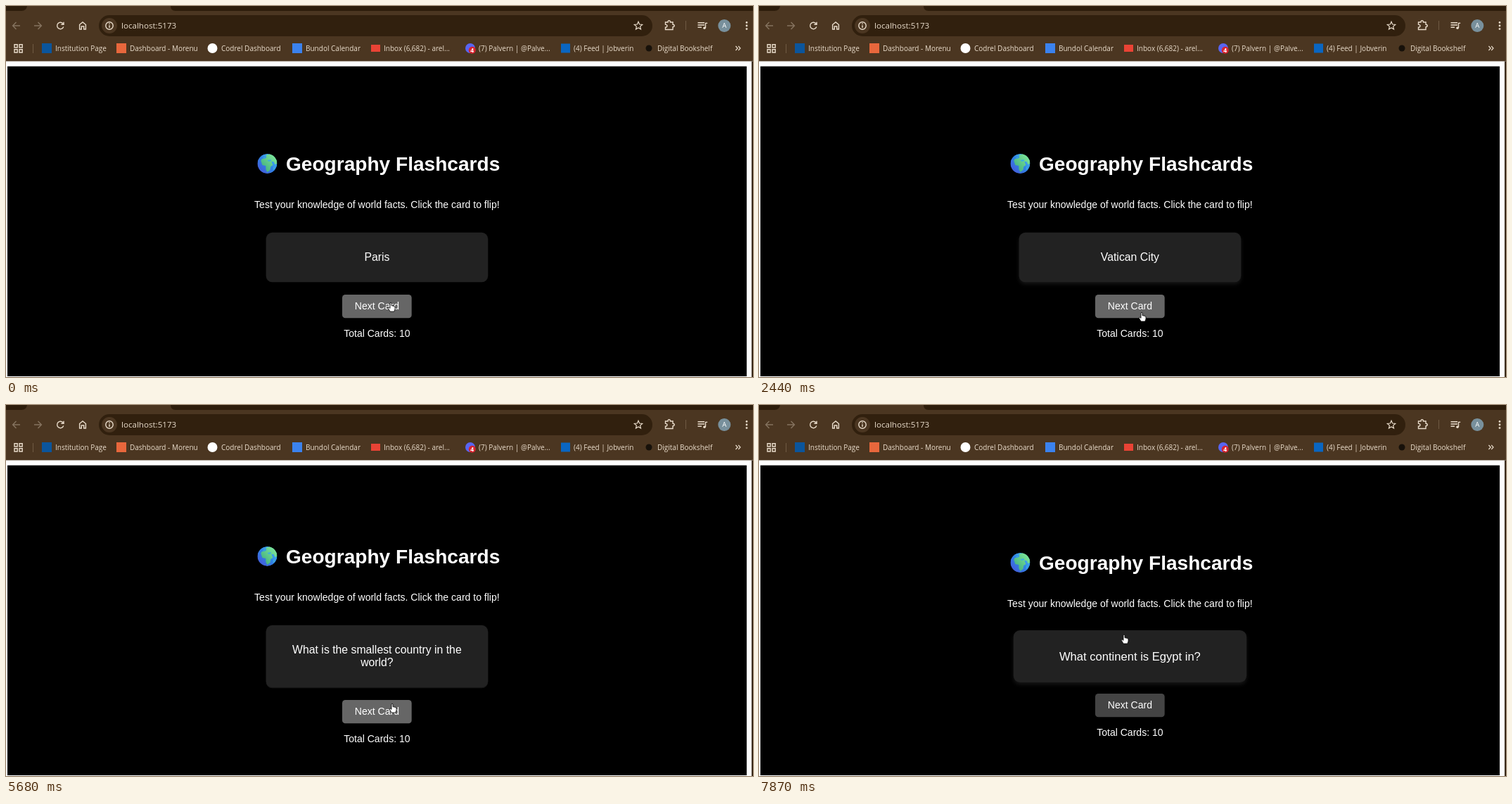
Animation of 1062x527 px, one loop 8000 ms. Source, as an HTML page:

```html
<!DOCTYPE html>
<html lang="en">
<head>
<meta charset="utf-8">
<title>Geography Flashcards</title>
<style>
  html, body { margin: 0; width: 100%; height: 100%; overflow: hidden; background: #000; }
  svg { display: block; width: 1062px; height: 527px; }
  .page { font-family: "Liberation Sans", Arial, sans-serif; fill: #fff; text-anchor: middle; font-size: 14.04px; }
  .bar { font-family: "Open Sans", "Noto Sans", sans-serif; font-size: 10px; fill: #e9dccb; }
  .line { fill: none; stroke: #e9dccb; stroke-width: 1.4; }
  .dim { stroke: #85735f; }
</style>
</head>
<body>
<svg viewBox="0 0 1062 527">
  <defs>
    <linearGradient id="sea" x1="0" y1="1" x2="1" y2="0">
      <stop offset="0" stop-color="#4a50d8"/>
      <stop offset=".5" stop-color="#2f82e4"/>
      <stop offset="1" stop-color="#4fd0f6"/>
    </linearGradient>
    <linearGradient id="land" x1="0" y1="1" x2="1" y2="0">
      <stop offset="0" stop-color="#39a67c"/>
      <stop offset="1" stop-color="#86ef9c"/>
    </linearGradient>
    <clipPath id="disc"><circle r="14"/></clipPath>
  </defs>

  <!-- browser chrome -->
  <rect width="1062" height="79" fill="#4b3621"/>
  <path d="M0 0H30Q29 7 22 7H0ZM234 0Q234 7 241 7H1062V0Z" fill="#2d1d0b"/>
  <rect x="132" y="13" width="787" height="30" rx="15" fill="#31200e"/>
  <circle cx="147" cy="28" r="11" fill="#4b3621"/>
  <g class="line">
    <path class="dim" d="M20 28H10M14.5 23L9.6 28L14.5 33M40 28H50M45.5 23L50.4 28L45.5 33"/>
    <path d="M81.2 25.2A4.7 4.7 0 1 0 81.8 29.6M82 22.8V26.2H78.4"/>
    <path d="M104.6 26.5L109 23L113.4 26.5V33H110.7V29H107.3V33H104.6Z"/>
    <circle cx="147" cy="28" r="5.2"/>
    <path d="M147 27.2V31M147 24.6V26"/>
    <path d="M899 22.2L900.6 26L904.7 26.4L901.6 29.1L902.5 33.1L899 31L895.5 33.1L896.4 29.1L893.3 26.4L897.4 26Z" stroke-width="1.2"/>
    <path d="M937.5 23H941Q941 20.6 942.7 20.6T944.4 23H948V26.3Q950.2 26.4 950.2 28T948 29.8V33.5H937.5V30.2Q940 30 940 28.2T937.5 26.4Z"/>
    <path d="M983.5 23.7H993M983.5 27H993M983.5 30.3H989M994.5 31V24.4H997.2"/>
    <path d="M1037.4 57L1040.2 60L1037.4 63M1041.2 57L1044 60L1041.2 63" stroke-width="1.2"/>
    <path d="M12 54.8H16.2V59H12ZM19 54.8H23.2V59H19ZM12 61.8H16.2V66H12ZM19 61.8H23.2V66H19Z"/>
  </g>
  <path d="M966.5 21V34M38.5 54V67" stroke="#6f5a43"/>
  <g fill="#e9dccb">
    <circle cx="993" cy="31.3" r="1.8"/>
    <circle cx="1053" cy="23.4" r="1.4"/><circle cx="1053" cy="28" r="1.4"/><circle cx="1053" cy="32.6" r="1.4"/>
  </g>
  <circle cx="1021.3" cy="28" r="9" fill="#78909c"/>

  <rect x="51" y="53" width="14" height="14" fill="#0b559c"/>
  <rect x="157" y="53" width="14" height="14" fill="#e8673c"/>
  <circle cx="293.5" cy="60" r="7" fill="#fff"/>
  <rect x="407" y="53" width="14" height="14" fill="#3b82ee"/>
  <rect x="519" y="55" width="13" height="10" fill="#ea4335"/>
  <circle cx="660" cy="60" r="7" fill="#5865f2"/>
  <circle cx="662.8" cy="62.8" r="5" fill="#d8232f"/>
  <rect x="789" y="53.5" width="13" height="13" fill="#0a66c2"/>
  <circle cx="914" cy="60" r="4.5" fill="#17110a"/>

  <g class="bar">
    <text x="164" y="32" font-size="11.6">localhost:5173</text>
    <text x="1021.3" y="31.4" font-size="9.5" text-anchor="middle" fill="#fff">A</text>
    <text x="662.8" y="66" font-size="8.5" font-weight="700" text-anchor="middle" fill="#fff">4</text>
    <text x="70" y="64">Institution Page</text>
    <text x="176" y="64">Dashboard - Morenu</text>
    <text x="306" y="64">Codrel Dashboard</text>
    <text x="426" y="64">Bundol Calendar</text>
    <text x="537" y="64">Inbox (6,682) - arel...</text>
    <text x="672" y="64">(7) Palvern | @Palve...</text>
    <text x="807" y="64">(4) Feed | Jobverin</text>
    <text x="926" y="64">Digital Bookshelf</text>
  </g>

  <!-- page -->
  <rect y="78.5" width="1062" height="449" fill="#fff"/>
  <rect x="1060" y="78.5" width="2" height="449" fill="#3a2a1a"/>
  <rect x="2" y="85.7" width="1051" height="440.3"/>
  <g class="page">
    <g id="head">
      <g transform="translate(371.4 224)" clip-path="url(#disc)">
        <circle r="14" fill="url(#sea)"/>
        <path d="M-9 -4Q-8 -8 -4 -7L-1 -9L-2 -12L4 -14L14 -9V0L11 1L9 -3L6 -3L8 2L5 4L4 9L0 12L-2 8L-2 3L-7 2Z" fill="url(#land)"/>
        <path d="M-6 -8L-3 -11L-4 -7ZM9 5L11 3L10 8L8 9ZM0 -5L5 -6L6 -4L2 -3Z" fill="#3faedd"/>
      </g>
      <text x="398" y="234" text-anchor="start" font-size="28.08" font-weight="700" style="text-anchor:start">Geography Flashcards</text>
      <text x="527.4" y="287.2">Test your knowledge of world facts. Click the card to flip!</text>
    </g>
    <g id="card">
      <rect id="face" x="369.6" width="315.7" rx="9" fill="#222"/>
      <text id="row1" x="527.4" font-size="15.8"></text>
      <text id="row2" x="527.4" y="371.4" font-size="15.8"></text>
    </g>
    <g id="foot">
      <rect id="btn" x="478" y="410" width="98.7" height="33.3" rx="4.4"/>
      <text x="527.4" y="431.3">Next Card</text>
      <text x="527.4" y="470.4">Total Cards: 10</text>
    </g>
  </g>
  <path id="cursor" fill="#fff" stroke="#000" stroke-width=".8" stroke-linejoin="round"/>
</svg>
<script>
const LOOP = 8000;
const HAND = 'M-1 .9Q0 -.8 1 .9V4.6L5 5.4Q6 5.8 6 7V9.5L4.9 13H-.9L-3.6 8.6Q-3.9 7 -2.4 7.2L-1 8.4Z';
const ARROW = 'M0 0V9.6L2.2 7.6L3.7 11L5.3 10.3L3.8 7H6.7Z';
const SMALLEST = ['What is the smallest country in the', 'world?'];

// bursts of screen updates: start, end, number of steps
const BURSTS = [[130, 940, 7], [1200, 1610, 4], [1890, 2440, 5], [2720, 3680, 7], [3830, 4100, 3],
  [4390, 5430, 9], [5680, 6640, 8], [6790, 7750, 8], [7870, 7870, 1]];

const TEXTS = [
  [0, ['Paris']], [400, SMALLEST], [1890, ['Vatican City']],
  [2800, ['What is the capital of France?']], [3450, ['Paris']],
  [4080, ['What is the official language of', 'Brazil?']], [4750, ['Portuguese']],
  [5680, SMALLEST], [6230, ['Vatican City']], [7050, ['What continent is Egypt in?']]
];

// pointer path: time, x, y
const PATH = [[0, 547, 421], [400, 547, 421], [940, 539, 426], [1200, 536, 410], [1340, 530, 380],
  [1610, 528, 372], [2160, 530, 376], [2440, 544, 435], [2860, 544, 430], [3140, 538, 402],
  [3280, 532, 372], [3680, 530, 370], [3830, 536, 398], [3965, 544, 421], [4100, 544, 421],
  [4390, 542, 413], [4650, 530, 375], [4910, 530, 376], [5040, 549.5, 409], [5180, 549, 422],
  [5680, 549, 424], [5940, 535, 394], [6210, 528, 372], [6365, 528, 376], [6640, 538, 404],
  [6790, 541, 428], [6927, 541, 442], [7200, 538, 430], [7480, 530, 412], [7613, 525, 385],
  [7750, 521, 345], [7870, 519, 326]];

const HOVERS = [[1280, 2150], [3200, 3690], [4500, 5035], [5900, 6540], [7580, 9000]];
const GLOWS = [[2300, 2800], [3700, 4080], [7700, LOOP]];

const el = id => document.getElementById(id);
const [head, card, face, row1, row2, foot, btn, cursor] =
  ['head', 'card', 'face', 'row1', 'row2', 'foot', 'btn', 'cursor'].map(el);
const clamp = v => Math.max(0, Math.min(1, v));
const ease = p => 1 - (1 - clamp(p)) ** 2.2;
const within = (ranges, t) => ranges.some(([a, b]) => t >= a && t < b);

function snap(t) {
  let s = 0;
  for (const [a, b, n] of BURSTS) {
    if (t < a) break;
    const gap = (b - a) / (n - 1) || 1;
    s = a + Math.min(n - 1, Math.floor((t - a + 1) / gap)) * gap;
  }
  return s;
}

function pointer(t) {
  const i = PATH.findIndex(k => k[0] > t);
  if (i < 0) return PATH[PATH.length - 1].slice(1);
  const [a, b] = [PATH[i - 1], PATH[i]];
  const p = (t - a[0]) / (b[0] - a[0]);
  return [1, 2].map(j => a[j] + (b[j] - a[j]) * p);
}

function zoom(t) {
  let z = 0;
  for (const [on, off] of HOVERS) if (t >= on) z = ease((t - on) / 300) * (1 - ease((t - off) / 300));
  return 1 + 0.05 * z;
}

function draw(now) {
  const t = snap(now % LOOP);
  const lines = TEXTS.filter(k => k[0] <= t).pop()[1];
  const shift = lines.length > 1 ? 9.05 : 0;
  const scale = zoom(t);
  const [x, y] = pointer(t);

  head.setAttribute('transform', `translate(0 ${-shift})`);
  foot.setAttribute('transform', `translate(0 ${shift})`);
  card.setAttribute('transform', `translate(527.4 357) scale(${scale}) translate(-527.4 -357)`);
  face.setAttribute('y', 321.8 - shift);
  face.setAttribute('height', 70.5 + 2 * shift);
  face.style.filter = within(GLOWS, t) ? 'drop-shadow(0 3px 2.5px rgba(255,255,255,.08))'
    : t < 400 ? 'none' : 'drop-shadow(0 1.7px 0 #151515)';
  row1.setAttribute('y', 362.3 - shift);
  row1.textContent = lines[0];
  row2.textContent = lines[1] || '';

  const onBtn = x > 478 && x < 576.7 && y >= 410 + shift && y < 443.3 + shift;
  const onCard = Math.abs(y - 357) < (35.25 + shift) * scale;
  btn.setAttribute('fill', onBtn ? '#666' : '#444');
  cursor.setAttribute('d', onBtn || onCard ? HAND : ARROW);
  cursor.setAttribute('transform', `translate(${x} ${y})`);
}

const start = performance.now();
function tick() {
  draw(performance.now() - start);
  requestAnimationFrame(tick);
}
tick();
</script>
</body>
</html>
```
